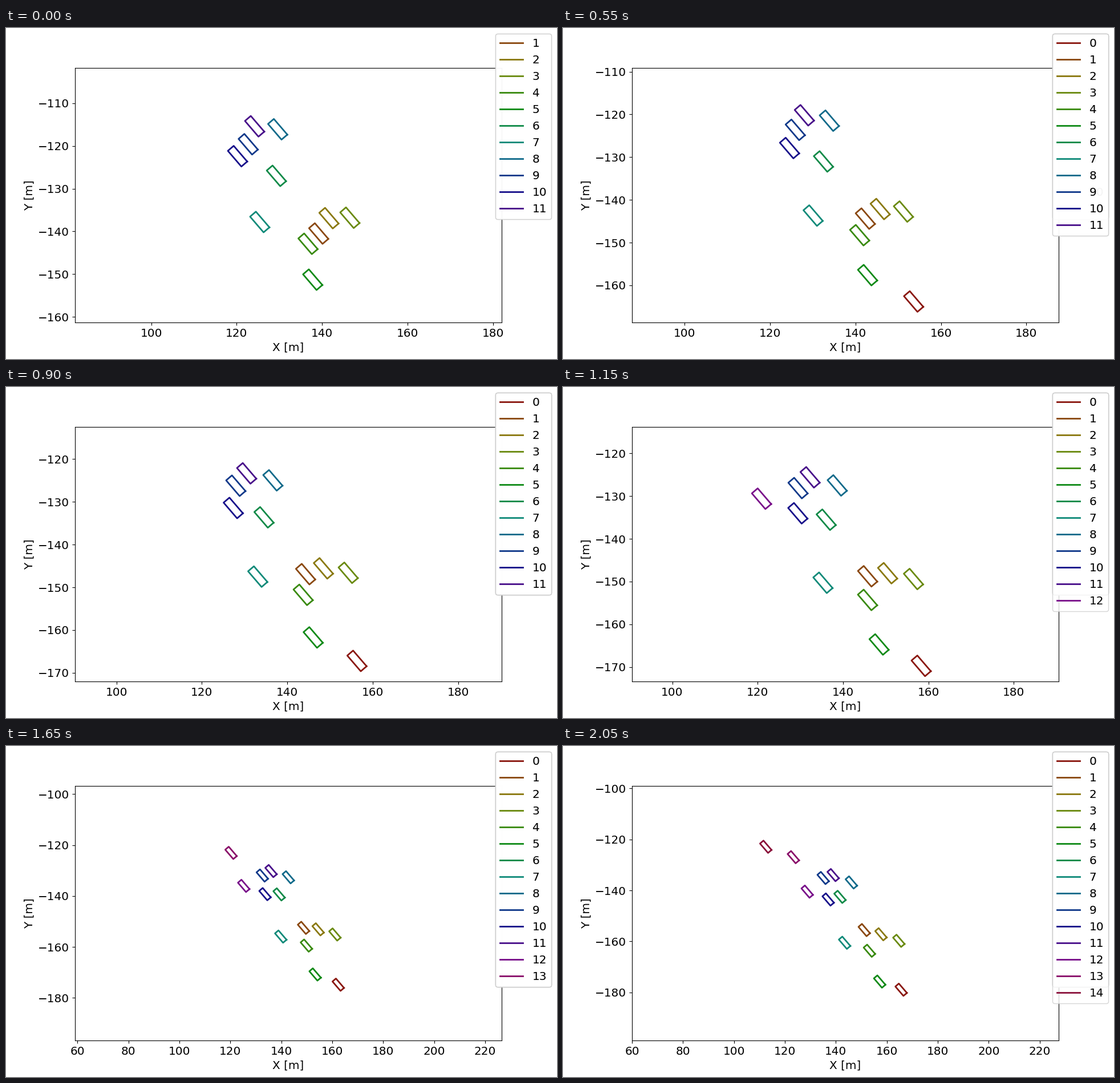
Write a matplotlib script that moves like this. It is 966 px wide and 580 px high and loops after 2.1 s.

```python
import colorsys

import matplotlib.pyplot as plt
import numpy as np
from matplotlib.animation import FuncAnimation
from matplotlib.lines import Line2D

FRAMES, INTERVAL = 42, 50
LENGTH, WIDTH = 4.85, 1.8
COURSE, HEADING = np.radians(-51.6), np.radians(-49.3)
HALF_VIEW = 50
ZOOM_OUT = 33      # the view widens from here on
LAYERS = 5         # translucent legends pile up, older ones are hidden

plt.rcParams.update({"font.family": "DejaVu Sans", "font.size": 14.4})

# Start x, start y and distance travelled over the loop, in metres.
VEHICLES = [
    (149.4, -158.5, 26.1), (139.2, -140.5, 19.2), (141.6, -136.9, 25.9),
    (146.5, -136.8, 29.3), (136.7, -142.9, 26.5), (137.8, -151.3, 31.2),
    (129.3, -127.0, 19.8), (125.4, -137.8, 29.0), (129.6, -116.1, 26.5),
    (122.7, -119.6, 19.8), (120.2, -122.4, 27.0), (124.2, -115.4, 23.7),
    (111.4, -118.6, 27.9), (108.2, -107.9, 24.3), (95.7, -101.7, 27.0),
]
COUNT = len(VEHICLES)
ENTRY = {0: 10, 12: 23, 13: 27, 14: 41}
COLORS = [colorsys.hls_to_rgb((i / COUNT + 0.01) % 1, 0.3, 0.8)
          for i in range(COUNT)]


def unit(angle):
    return np.array([np.cos(angle), np.sin(angle)])


def visible(step):
    return [i for i in range(COUNT) if step >= ENTRY.get(i, 0)]


def positions(step):
    """All vehicles run in parallel and speed up slightly."""
    u = step / (FRAMES - 1)
    progress = u - 0.05 * u * (1 - u)
    return np.array([(x, y) + unit(COURSE) * travel * progress
                     for x, y, travel in VEHICLES])


along = unit(HEADING) * LENGTH / 2
across = unit(HEADING + np.pi / 2) * WIDTH / 2
outline = np.array([along + across, along - across, -along - across,
                    across - along, along + across])

fig, ax = plt.subplots(figsize=(9.66, 5.8), dpi=100)
ax.set_xlabel("X [m]")
ax.set_ylabel("Y [m]")
boxes = [ax.plot([], [], color=c, lw=2)[0] for c in COLORS]
handles = [Line2D([], [], color=c, lw=2, label=str(i))
           for i, c in enumerate(COLORS)]
ratio = (0.775 * 966) / (0.77 * 580)


def draw(step):
    centers = positions(step)
    shown = visible(step)
    for i, box in enumerate(boxes):
        box.set_visible(i in shown)
        box.set_data(*(centers[i] + outline).T)

    # The camera follows the mean position at equal axis scales.
    cx, cy = centers[shown].mean(axis=0)
    half_y = HALF_VIEW if step >= ZOOM_OUT else HALF_VIEW / ratio
    ax.set_xlim(cx - half_y * ratio, cx + half_y * ratio)
    ax.set_ylim(cy - half_y, cy + half_y)

    for old in list(fig.legends):
        old.remove()
    # The opening step counts twice.
    for past in range(max(-1, step - LAYERS + 1), step + 1):
        fig.legend(handles=[handles[i] for i in visible(max(past, 0))],
                   loc="upper right")
    return boxes


anim = FuncAnimation(fig, draw, frames=FRAMES, interval=INTERVAL,
                     repeat=True, repeat_delay=0, blit=False)
plt.show()
```
